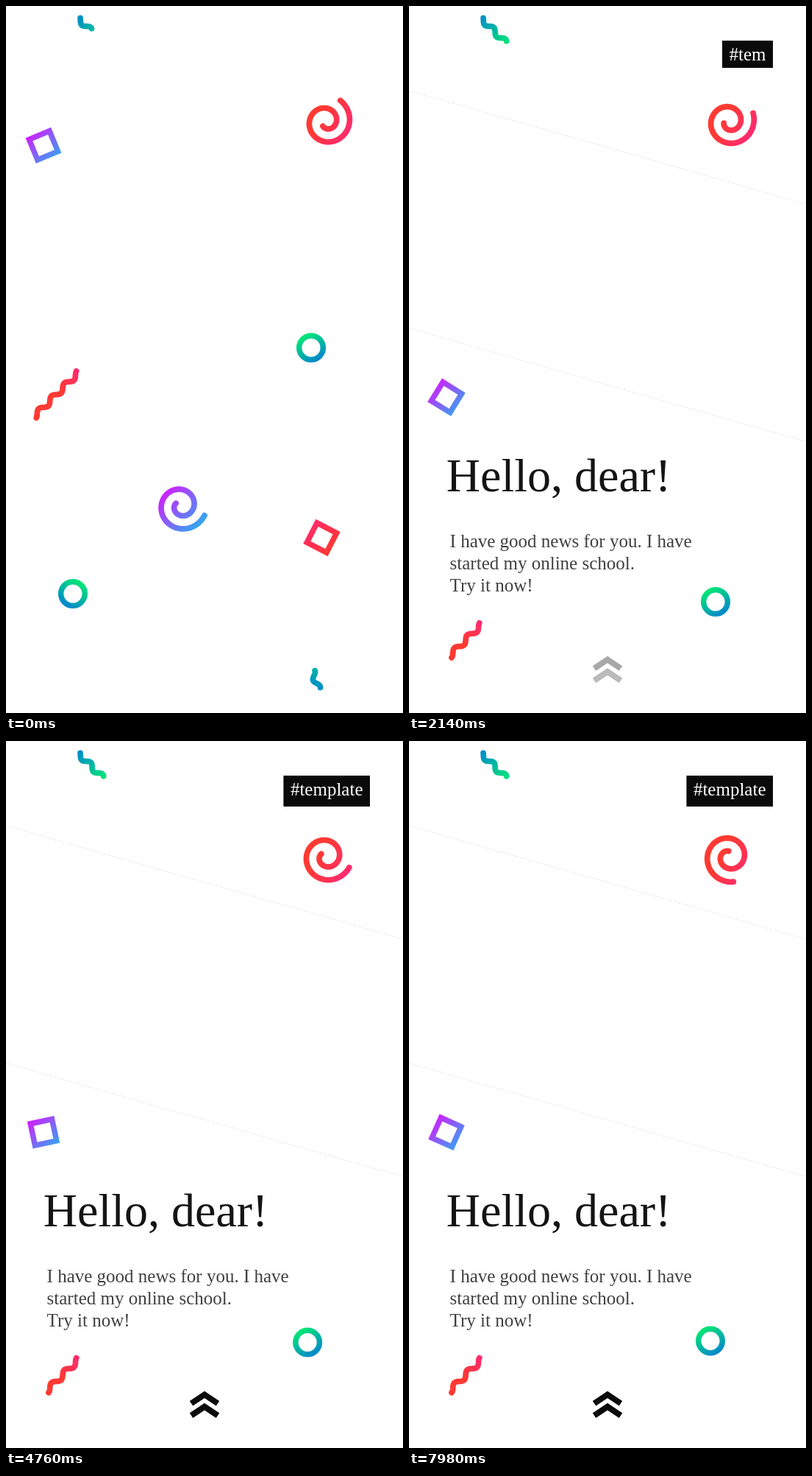
Animation, 540 px wide and 960 px high, one loop 8000 ms. Source, as an HTML page with a canvas:

```html
<!DOCTYPE html>
<html lang="en">
<head>
<meta charset="utf-8">
<title>Hello, dear!</title>
<style>
  html, body { margin: 0; width: 100%; height: 100%; overflow: hidden; background: #fff; }
  canvas { display: block; }
</style>
</head>
<body>
<canvas id="stage" width="540" height="960"></canvas>
<script>
const ctx = document.getElementById('stage').getContext('2d');
const LOOP = 8, SLIDE = 342, LINE_WIDTH = 7.7;
const SERIF = '"Liberation Serif", "Times New Roman", serif';
const TEAL = ['#00e676', '#0088cc'];
const TEAL_REVERSED = ['#0090c4', '#00e07c'];
const VIOLET = ['#d41cff', '#36a4f0'];
const RED = ['#ff3a32', '#ff2a70'];
const RED_REVERSED = ['#ff2a6a', '#ff3a30'];

const clamp = v => Math.max(0, Math.min(1, v));
const progress = (t, start, duration) => clamp((t - start) / duration);
const easeOut = p => 1 - (1 - p) ** 3;
const easeInOut = p => p < .5 ? 4 * p ** 3 : 1 - 4 * (1 - p) ** 3;
const rad = deg => deg * Math.PI / 180;

function gradient(x0, y0, x1, y1, colors) {
  const g = ctx.createLinearGradient(x0, y0, x1, y1);
  colors.forEach((c, i) => g.addColorStop(i, c));
  return g;
}

function strokePath(points, style, cap = 'round', join = 'round', width = LINE_WIDTH) {
  ctx.beginPath();
  points.forEach(([x, y]) => ctx.lineTo(x, y));
  ctx.strokeStyle = style;
  ctx.lineWidth = width;
  ctx.lineCap = cap;
  ctx.lineJoin = join;
  ctx.stroke();
}

function spiral(cx, cy, angle, style) {
  const points = [];
  for (let a = 0; a <= 544; a += 4) {
    const r = 34.6 - 27 * a / 544, th = rad(angle + a);
    points.push([cx + r * Math.cos(th), cy + r * Math.sin(th)]);
  }
  strokePath(points, style);
}

// Sine wave along a direction, drawn between two distances from its origin.
function squiggle({ x, y, dir, side, wave, amp }, from, to, style) {
  const ux = Math.cos(rad(dir)), uy = Math.sin(rad(dir));
  const nx = -uy * side, ny = ux * side;
  const points = [], steps = 60;
  for (let i = 0; i <= steps; i++) {
    const s = from + (to - from) * i / steps;
    const d = amp * Math.sin(s * 2 * Math.PI / wave);
    points.push([x + s * ux + d * nx, y + s * uy + d * ny]);
  }
  strokePath(points, style);
}

function square(cx, cy, angle, colors) {
  const corner = k => {
    const th = rad(angle + 45 + 90 * k);
    return [cx + 21.2 * Math.cos(th), cy + 21.2 * Math.sin(th)];
  };
  const points = [0, 1, 2, 3, 4, 5].map(corner);
  strokePath(points, gradient(cx - 18, cy - 18, cx + 18, cy + 18, colors), 'butt', 'miter', 7.5);
}

function ring(cx, cy, side) {
  ctx.beginPath();
  ctx.arc(cx, cy, 16.3, 0, 2 * Math.PI);
  ctx.strokeStyle = gradient(cx - 10 * side, cy - 16, cx + 10 * side, cy + 16, TEAL);
  ctx.lineWidth = 7.5;
  ctx.stroke();
}

// Smooth curve through [time, x, y] keys.
function follow(keys, t) {
  const last = keys.length - 1;
  let i = 0;
  while (i < last - 1 && t > keys[i + 1][0]) i++;
  const a = keys[i], b = keys[i + 1], before = keys[Math.max(0, i - 1)], after = keys[Math.min(last, i + 2)];
  const h = b[0] - a[0], u = clamp((t - a[0]) / h);
  return [1, 2].map(k => {
    const m0 = h * (b[k] - before[k]) / (b[0] - before[0]);
    const m1 = h * (after[k] - a[k]) / (after[0] - a[0]);
    return a[k] + u * m0 + u * u * (3 * (b[k] - a[k]) - 2 * m0 - m1) + u ** 3 * (2 * (a[k] - b[k]) + m0 + m1);
  });
}

const TOP_WAVE = { x: 101.3, y: 19.6, dir: 45, side: 1, wave: 22.4, amp: 3.3 };
const RED_WAVE = { x: 94.5, y: 501.5, dir: 135, side: -1, wave: 24.6, amp: 3.4 };
const LOW_WAVE = { x: 408.5, y: 878, dir: 71.5, side: -1, wave: 22, amp: 3.3 };
const RIGHT_RING = [[0, 415, 464], [.96, 420, 462.7], [1.44, 420.5, 463.5], [2.14, 417, 467],
  [3.78, 405, 473.5], [5.74, 416, 474.5], [7.98, 410, 472.6]];
const LEFT_RING = [[0, 91, 798], [.96, 86, 803], [1.44, 81.5, 807], [2.14, 76, 812]];
const TEXT = [
  ['Hello, dear!', 50.8, 317, 64, '#141414'],
  ['I have good news for you. I have', 55.6, 393, 25, '#404040'],
  ['started my online school.', 55.6, 423, 25, '#404040'],
  ['Try it now!', 55.6, 453, 25, '#404040']
];

function drawText(t) {
  ctx.textAlign = 'left';
  TEXT.forEach(([text, x, y, size, color], i) => {
    const p = easeOut(progress(t, .06 + i * .2, .6));
    ctx.globalAlpha = p;
    ctx.font = `${size}px ${SERIF}`;
    ctx.fillStyle = color;
    ctx.fillText(text, x, y + 30 * (1 - p));
  });
  ctx.globalAlpha = 1;
}

function drawTag(t) {
  const text = '#template'.slice(0, Math.max(0, Math.floor((t - 1.8) / .085)));
  if (!text) return;
  const right = 485.5, base = 74, pad = 9.8;
  ctx.font = `25px ${SERIF}`;
  ctx.textAlign = 'left';
  const m = ctx.measureText(text), left = right - m.width;
  const top = Math.round(base - m.actualBoundingBoxAscent - pad);
  const bottom = Math.round(base + Math.max(0, m.actualBoundingBoxDescent) + pad);
  ctx.fillStyle = '#0a0a0a';
  ctx.fillRect(left - 9.5, top, m.width + 19, bottom - top);
  ctx.fillStyle = '#fff';
  ctx.fillText(text, left, base);
}

function drawChevrons(t) {
  [0, 1].forEach(i => {
    const y = i * 16.4;
    ctx.globalAlpha = progress(t, 2 + i * .03, .4);
    strokePath([[252, 899.5 + y], [270, 887.5 + y], [288, 899.5 + y]], '#0a0a0a', 'butt', 'miter', 8);
  });
  ctx.globalAlpha = 1;
}

function drawBand(height) {
  if (height <= 0) return;
  ctx.setLineDash([1, 2.67]);
  [115, 115 + height].forEach(y =>
    strokePath([[0, y], [540, y + 154]], '#b0b0b0', 'butt', 'miter', .7));
  ctx.setLineDash([]);
}

function draw(t) {
  ctx.fillStyle = '#fff';
  ctx.fillRect(0, 0, 540, 960);
  const slide = SLIDE * easeInOut(progress(t, 1.12, .99));
  const settle = Math.exp(-t / .36);
  const turn = 17.1 * t, spin = -16.7 * t;

  drawBand(slide - 19.5);

  ctx.save();
  ctx.translate(0, slide);
  square(51, 189.3, -22.5 + spin, VIOLET);
  square(429.5, 722, 27.3 + spin, RED_REVERSED);
  spiral(238, 678.6, 22.4 + turn, gradient(214, 657, 264, 703, VIOLET));
  ring(...follow(RIGHT_RING, t), 1);
  ring(...follow(LEFT_RING, t), -1);
  squiggle(RED_WAVE, -5, 55 + 23.5 * settle, gradient(74, 522, 98, 494, RED));
  squiggle(LOW_WAVE, -8 + 35 * settle, 39.3 + 11.7 * settle, gradient(404, 872, 420, 918, ['#00e07c', '#0095c0']));
  drawText(t);
  ctx.restore();

  squiggle(TOP_WAVE, -2.5, 42.1 - 23.6 * settle, gradient(100, 17, 132, 49, TEAL_REVERSED));
  spiral(435.5, 157.1, -56.2 + turn, gradient(428, 151, 467, 175, RED));
  drawTag(t);
  drawChevrons(t);
}

function frame() {
  draw(performance.now() / 1000 % LOOP);
  requestAnimationFrame(frame);
}
frame();
</script>
</body>
</html>
```
